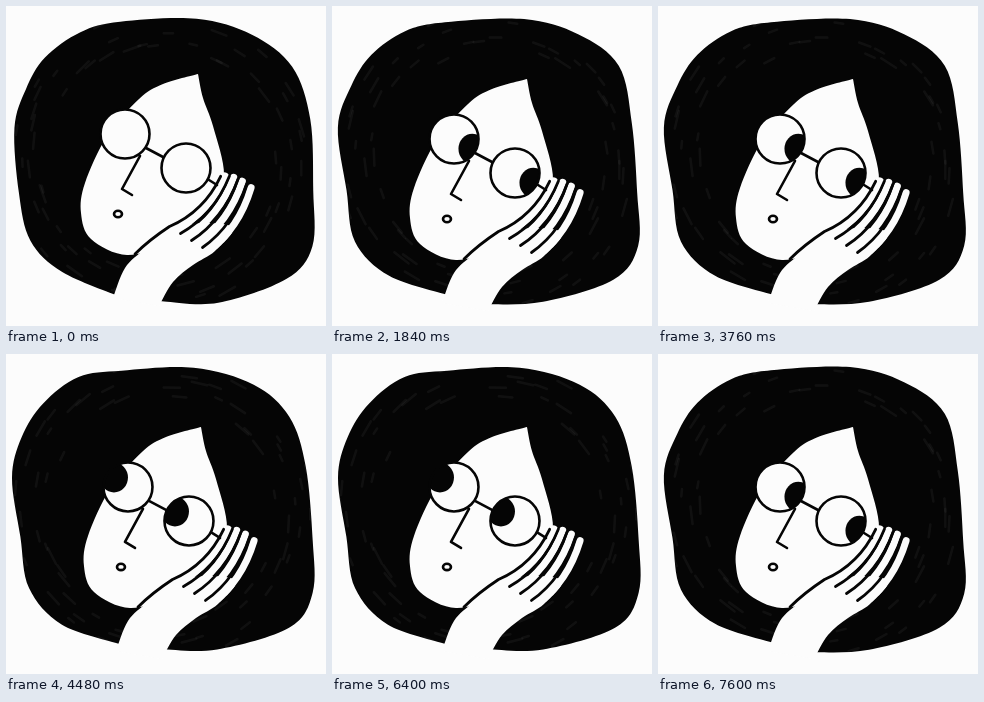
Write an HTML page with a canvas that moves like this. It is 320x320 px and loops after 7720 ms.

```html
<!DOCTYPE html>
<html>
<head>
<meta charset="utf-8">
<style>
html, body { margin: 0; width: 100%; height: 100%; overflow: hidden; background: #fcfcfc; }
canvas { display: block; width: 100vw; height: 100vh; }
</style>
</head>
<body>
<canvas width="320" height="320"></canvas>
<script>
const ctx = document.querySelector('canvas').getContext('2d');
const INK = '#050505', PAPER = '#fcfcfc', LOOP = 7720, STEPS = 16;

// Key points of the soft shapes, clockwise.
const HAIR = [114,290, 56,268, 22,236, 13,185, 6,123, 18,82, 38,50, 72,25, 115,17, 190,13,
  248,29, 285,62, 302,115, 306,185, 305,238, 282,274, 212,296, 157,297];
const FACE = [195,73, 160,83, 136,98, 104,135, 82,182, 78,212, 88,238, 124,254,
  165,240, 207,205, 221,174, 210,125, 200,97, 195,73];
const PALM = [110,297, 122,267, 142,248, 168,228, 200,222, 230,227, 212,250, 190,264,
  170,281, 156,305];

const rand = n => { const v = Math.sin(n * 127.1 + 11.7) * 43758.5453; return v - Math.floor(v); };

// Smooth curve through all points.
function curve(p) {
  const n = p.length / 2;
  const at = i => { i = Math.max(0, Math.min(n - 1, i)) * 2; return [p[i], p[i + 1]]; };
  ctx.beginPath();
  ctx.moveTo(p[0], p[1]);
  for (let i = 0; i < n - 1; i++) {
    const [a, b, c, d] = [at(i - 1), at(i), at(i + 1), at(i + 2)];
    ctx.bezierCurveTo(b[0] + (c[0] - a[0]) / 6, b[1] + (c[1] - a[1]) / 6,
      c[0] - (d[0] - b[0]) / 6, c[1] - (d[1] - b[1]) / 6, ...c);
  }
}

function oval(x, y, rx, ry = rx) {
  ctx.beginPath();
  ctx.ellipse(x, y, rx, ry, 0, 0, 7);
}

function line(...p) {
  ctx.beginPath();
  for (let i = 0; i < p.length; i += 2) ctx.lineTo(p[i], p[i + 1]);
  ctx.stroke();
}

function fill(color) {
  ctx.fillStyle = color;
  ctx.fill();
}

function pen(color, width) {
  ctx.strokeStyle = color;
  ctx.lineWidth = width;
}

// The outline is redrawn by a slightly unsteady hand on every step.
function drawHair(step) {
  curve(HAIR.map((v, i) => v + (rand(step * 50 + i) - 0.5) * 5));
  fill(INK);
  ctx.save();
  ctx.clip();
  pen('rgba(120,120,120,.1)', 2.5);
  for (let i = 0; i < 70; i++) {
    const s = step * 200 + i * 2, a = i * 2.4, r = 110 + 40 * rand(s);
    const x = 157 + r * Math.cos(a), y = 155 + r * Math.sin(a);
    const len = 6 + 12 * rand(s + 1);
    line(x, y, x - len * Math.sin(a), y + len * Math.cos(a));
  }
  ctx.restore();
}

// Curve along finger i from tip to knuckle; halves lie between fingers.
function finger(i) {
  const tx = 222 + 8.7 * i, ty = 175 + 1.3 * i * i;
  const kx = 172 + 11 * i, ky = 229 + 7 * i;
  ctx.beginPath();
  ctx.moveTo(tx, ty);
  ctx.quadraticCurveTo((tx + kx) / 2 + 9, (ty + ky) / 2 + 10, kx, ky);
}

function drawHand() {
  curve(PALM);
  fill(PAPER);
  pen(PAPER, 7);
  for (let i = 0; i < 4; i++) {
    finger(i);
    ctx.stroke();
  }
  pen(INK, 2.8);
  for (let i = -0.5; i < 3; i++) {
    finger(i);
    if (i < 0) ctx.quadraticCurveTo(146, 239, 132, 253);
    ctx.stroke();
  }
}

// The pupils roll clockwise and slip out of sight on the first step.
function drawEye(x, y, step) {
  oval(x, y, 24.5);
  fill(PAPER);
  if (step) {
    const a = (214 + (step - 5) * 17.4) * Math.PI / 180;
    const r = 16 + 0.1 * (step - 8) ** 2;
    ctx.save();
    ctx.clip();
    oval(x + r * Math.cos(a), y + r * Math.sin(a), 14, 15);
    fill(INK);
    ctx.restore();
  }
  oval(x, y, 24.5);
  ctx.stroke();
}

function draw(step) {
  ctx.fillStyle = PAPER;
  ctx.fillRect(0, 0, 320, 320);
  ctx.lineCap = ctx.lineJoin = 'round';
  drawHair(step);

  const lift = Math.exp(-step);
  ctx.save();
  ctx.translate(-3 * lift, -5 * lift);
  curve(FACE);
  fill(PAPER);
  drawHand();
  pen(INK, 2.6);
  line(143, 147, 160, 156);
  line(206, 179, 214, 184);
  line(137, 155, 119, 188, 129, 194);
  drawEye(122, 133, step);
  drawEye(183, 167, step);
  oval(115, 213, 4, 3.2);
  ctx.stroke();
  ctx.restore();
}

let shown = -1;
function tick(now) {
  const t = now % LOOP;
  const step = (t < 160 ? 0 : 1 + Math.floor((t - 160) / 120)) % STEPS;
  if (step !== shown) draw(shown = step);
  requestAnimationFrame(tick);
}
tick(performance.now());
</script>
</body>
</html>
```
